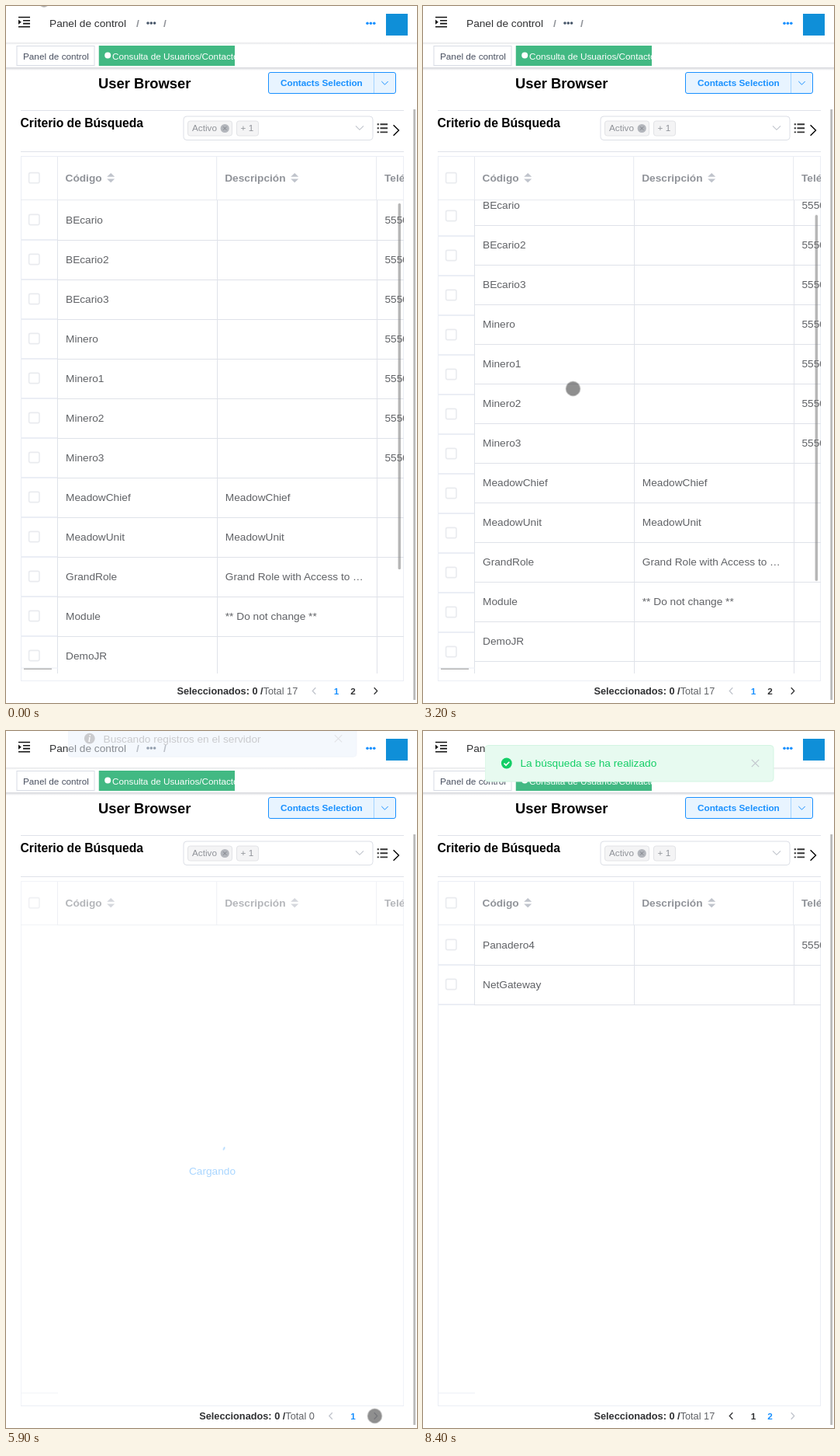
Animation, 530 px wide and 897 px high, one loop 9100 ms. Source, as an HTML page:

```html
<!DOCTYPE html>
<html lang="es">
<head>
<meta charset="utf-8">
<title>User Browser</title>
<style>
  html, body { margin: 0; width: 100%; height: 100%; overflow: hidden; background: #fff; }
  svg { display: block; }
  #stage { width: 100vw; height: 100vh; font: 13.7px "Liberation Sans", Arial, sans-serif; }
  text { fill: #606266; white-space: pre; }
  .bold { font-weight: bold; }
  .small { font-size: 11.76px; }
  .head { font-weight: bold; fill: #909399; }
  .dark { fill: #303133; }
  .muted { fill: #909399; }
  .blue { fill: #1890ff; }
  .mid { text-anchor: middle; }
  .line { stroke: #dfe2e9; fill: none; }
  .soft { stroke: #ebeef5; fill: none; }
  .box { fill: #fff; stroke: #e9ebef; stroke-width: 1.6; }
  .icon { fill: none; stroke: #303133; stroke-width: 1.3; }
  .icon.pale { stroke: #c0c4cc; }
  .bar { fill: rgba(125, 125, 125, .55); }
  .pager { font-size: 12.74px; }
</style>
</head>
<body>
<svg id="stage" viewBox="0 0 530 897" xmlns="http://www.w3.org/2000/svg">
  <defs>
    <linearGradient id="shade" x2="0" y2="1">
      <stop offset="0" stop-color="#d3d5d9"/><stop offset="1" stop-color="#fff"/>
    </linearGradient>
    <g id="sort" fill="#c0c4cc"><path d="M-5-1.2 0-6 5-1.2zM-5 1.4 0 6.2 5 1.4z"/></g>
    <path id="prev" d="M1.8-4.2-2.2 0l4 4.2"/>
    <path id="next" d="M-1.8-4.2 2.2 0l-4 4.2"/>
    <path id="cross" d="M-4.7-4.7 4.7 4.7M4.7-4.7-4.7 4.7" stroke="#c0c4cc" stroke-width="1.1"/>
  </defs>

  <!-- navigation bar -->
  <path d="M16 14.5h15M22 18.8h9M22 22.6h9M16 26.8h15" stroke="#111" stroke-width="1.6"/>
  <path d="M16 17.6v6.2l3.8-3.1z" fill="#111"/>
  <text x="56" y="27" class="dark">Panel de control</text>
  <text x="168" y="27" class="head">/</text>
  <g fill="#48576a"><circle cx="183" cy="22" r="1.8"/><circle cx="187.3" cy="22" r="1.8"/><circle cx="191.6" cy="22" r="1.8"/></g>
  <text x="203" y="27" class="head">/</text>
  <g class="blue"><circle cx="466" cy="22.3" r="1.8"/><circle cx="470.4" cy="22.3" r="1.8"/><circle cx="474.8" cy="22.3" r="1.8"/></g>
  <rect x="490" y="10" width="28" height="28" fill="#0f8fd8"/>
  <rect y="47" width="530" height="3" fill="url(#shade)" opacity=".6"/>

  <!-- open views -->
  <rect x="14" y="51.5" width="100" height="25" fill="#fff" stroke="#d8dce5"/>
  <text x="22" y="69" class="small" style="fill:#495060">Panel de control</text>
  <svg x="119.5" y="51" width="175.5" height="26">
    <rect width="176" height="26" fill="#42b983"/>
    <circle cx="11.7" cy="12.5" r="4" fill="#fff"/>
    <text x="17.5" y="18" class="small" style="fill:#fff">Consulta de Usuarios/Contactos</text>
  </svg>
  <rect y="79" width="530" height="4" fill="url(#shade)"/>

  <!-- title and criteria -->
  <text x="119" y="106" class="bold" style="font-size:18.35px;fill:#000">User Browser</text>
  <rect x="338.5" y="85.5" width="164" height="27" rx="2.5" fill="#e8f4ff" stroke="#1890ff"/>
  <path d="M474.5 86v26" stroke="#a3d3ff"/>
  <text x="354" y="103" class="small bold blue">Contacts Selection</text>
  <path d="M484.3 97l4.2 4.2 4.2-4.2" class="icon" style="stroke:#1890ff;stroke-width:1"/>
  <path d="M19 134.5h494M19 187.5h494" class="line"/>
  <text x="18.5" y="156" class="bold" style="font-size:15.68px;fill:#000">Criterio de Búsqueda</text>
  <rect x="229" y="142" width="244" height="30.5" rx="4" fill="#fff" stroke="#dcdfe6"/>
  <g fill="#f4f4f5" stroke="#e2e3e6">
    <rect x="234.5" y="148" width="57" height="19" rx="3"/><rect x="297.5" y="148" width="28" height="19" rx="3"/>
  </g>
  <text x="240" y="161.3" class="small muted">Activo</text>
  <circle cx="282.2" cy="157.5" r="5.6" fill="#b3b6bc"/>
  <path d="M280 155.3l4.4 4.4M284.4 155.3l-4.4 4.4" stroke="#80838a"/>
  <text x="302.5" y="161.3" class="small muted">+ 1</text>
  <path d="M451 154.3l5 5 5-5" class="icon pale" style="stroke-width:1.1"/>
  <path d="M482.5 152.2h9.6M482.5 157.3h9.6M482.5 162.4h9.6M478.7 152.2h2.2M478.7 157.3h2.2M478.7 162.4h2.2" stroke="#333" stroke-width="1.9"/>
  <path d="M499.6 153.2l6.9 6.8-6.9 6.8" class="icon" style="stroke:#000;stroke-width:1.4"/>
  <rect x="525.3" y="133" width="2.8" height="760" fill="#b9b9b9"/>

  <!-- table -->
  <path d="M19 193.5h494M19 868.5h494M19.5 193v675M512.5 193v675" class="soft"/>
  <path d="M19 249.7h494M66.5 194v56M271.7 194v56M477.7 194v56" class="line" style="stroke:#e6e9ef"/>
  <rect x="29.6" y="214.6" width="13.4" height="13.2" rx="2" class="box"/>
  <text x="76.5" y="226" class="head">Código</text><use href="#sort" x="135.2" y="221"/>
  <text x="282.2" y="226" class="head">Descripción</text><use href="#sort" x="372.2" y="221"/>
  <svg x="478" y="194" width="35" height="55"><text x="10" y="32" class="head">Teléfono</text></svg>

  <svg x="20" y="250" width="493" height="609" viewBox="20 250 493 609">
    <g id="body1"></g><g id="body2"></g>
  </svg>
  <svg x="20" y="250" width="46" height="601.5" viewBox="20 250 46 601.5">
    <rect x="20" y="250" width="46" height="602" fill="#fff"/>
    <g id="side1"></g><g id="side2"></g>
  </svg>
  <path d="M20 852h47" class="soft"/>
  <g id="bars">
    <rect id="thumb" x="505.6" y="254" width="3.5" height="471" rx="1.5" class="bar"/>
    <rect x="23" y="852.4" width="36" height="1.6" class="bar"/>
  </g>

  <g id="mask">
    <rect x="19" y="193" width="494" height="675" fill="#fff" opacity=".9"/>
    <g transform="translate(266 531) scale(.823)">
      <circle id="spin" r="20" fill="none" stroke="#1890ff" stroke-width="2" stroke-linecap="round"/>
    </g>
    <text x="266" y="571" class="mid blue">Cargando</text>
  </g>

  <g id="pagers" class="pager"></g>
  <g id="info"></g>
  <g id="done"></g>
  <circle id="dot" r="9.2" fill="rgba(64,64,64,.59)" stroke="rgba(90,90,90,.35)" stroke-width=".7"/>
</svg>

<script>
const LOOP = 9100, STEP = 100;
const $ = id => document.getElementById(id);
const tracks = [];

// keys: [ms, value, easing towards the next key]
function track(id, prop, keys, format = v => v) {
  const all = [[0, keys[0][1]], ...keys, [LOOP, keys.at(-1)[1]]];
  const frames = all.map(([ms, v, easing = 'linear']) => ({ offset: ms / LOOP, [prop]: format(v), easing }));
  const anim = $(id).animate(frames, LOOP);
  anim.pause();
  tracks.push(anim);
}
const move = ([x, y]) => `translate(${x}px, ${y}px)`;
const show = (id, from, to) =>
  track(id, 'opacity', [[0, from ? 0 : 1, 'step-end'], [from, 1, 'step-end'], [to, to < LOOP ? 0 : 1]]);

// table rows
const page1 = [
  ['BEcario', '', 1], ['BEcario2', '', 1], ['BEcario3', '', 1],
  ['Minero', '', 1], ['Minero1', '', 1], ['Minero2', '', 1], ['Minero3', '', 1],
  ['MeadowChief', 'MeadowChief'], ['MeadowUnit', 'MeadowUnit'],
  ['GrandRole', 'Grand Role with Access to …'], ['Module', '** Do not change **'], ['DemoJR', ''],
  ['Panadero', '', 1], ['Panadero2', '', 1], ['Panadero3', '', 1]
];
const page2 = [['Panadero4', '', 1], ['NetGateway', '']];

function fillRows(n, rows) {
  const end = 250 + 51 * rows.length;
  $('body' + n).innerHTML = rows.map(([name, info, phone], i) => {
    const y = 250 + 51 * i;
    return `<text x="77" y="${y + 30}">${name}</text><text x="282.8" y="${y + 30}">${info}</text>
      ${phone ? `<text x="488.5" y="${y + 30}">5550</text>` : ''}
      <path d="M20 ${y + 51.5}H513" class="line"/>`;
  }).join('') + `<path d="M66.5 250V${end}M272.5 250V${end}M478.5 250V${end}" class="line"/>`;
  $('side' + n).innerHTML = rows.map((_, i) => {
    const y = 250 + 51 * i;
    return `<rect x="29.6" y="${y + 18.4}" width="13.4" height="13.2" rx="2" class="box"/>
      <path d="M20 ${y + 51}H66" class="soft" stroke-width="1.8"/>`;
  }).join('');
}
fillRows(1, page1);
fillRows(2, page2);

// footer states: total, text start, previous arrow, pages, current page
const arrow = (kind, x, on) => `<use href="#${kind}" x="${x}" y="881.5" class="icon ${on ? '' : 'pale'}"/>`;
function pager(id, total, x, prevX, pages, current) {
  const first = 447.5 - 21.5 * (pages - 1);
  let s = `<g id="${id}"><text x="${x}" y="886"><tspan class="bold dark">Seleccionados: 0 /</tspan>Total ${total}</text>`;
  s += arrow('prev', prevX, current > 1) + arrow('next', 476.5, current < pages);
  for (let p = 1; p <= pages; p++)
    s += `<text x="${first + 21.5 * (p - 1)}" y="886" class="small bold mid ${p === current ? 'blue' : 'dark'}">${p}</text>`;
  return s + '</g>';
}
$('pagers').innerHTML = pager('foot1', 17, 220.5, 397.5, 2, 1)
  + pager('foot0', 0, 249.2, 419, 1, 1) + pager('foot2', 17, 220.5, 397.5, 2, 2);

// notices
const notice = (bg, edge, ink, sign, msg) => `
  <rect x=".5" y=".5" width="372" height="46.5" rx="4" fill="${bg}" stroke="${edge}"/>
  <circle cx="28.3" cy="23.5" r="6.9" fill="${ink}"/>${sign}
  <text x="46" y="28.3" style="fill:${ink}">${msg}</text><use href="#cross" x="349" y="23.5"/>`;
$('info').innerHTML = notice('#e9f0fb', '#e3eaf5', '#909399',
  '<text x="28" y="27.7" class="mid" style="font:italic bold 11.5px Liberation Serif,serif;fill:#fff">i</text>',
  'Buscando registros en el servidor');
$('done').innerHTML = notice('#e7faf0', '#d3f5e2', '#13ce66',
  '<path d="M25 23.6l2.5 2.5 4.3-4.4" fill="none" stroke="#fff" stroke-width="1.5"/>',
  'La búsqueda se ha realizado');

// scrolling; the fixed column trails the body on the second pass
const pull = [[1700, 0], [1800, 35], [1900, 110], [2000, 157], [2700, 157], [2800, 0], [3000, 0]];
const back = [[3400, 157], [3700, 157], [3800, 142], [3900, 107], [4000, 70], [4100, 34], [4200, 0]];
const body = [...pull, [3100, 5], [3200, 19], [3300, 90], ...back];
const side = [...pull, [3100, 0], [3200, 5], [3300, 60], ...back];
track('body1', 'transform', body, v => move([0, -v]));
track('side1', 'transform', side, v => move([0, -v]));
track('thumb', 'transform', body, v => move([0, v * .78]));
track('bars', 'opacity', [[2200, 1], [2300, .45], [2400, 0], [2700, 0], [2800, 1], [4400, 1], [4500, .45], [4600, 0]]);

// page change
const CLICK = 5900, DATA = 6600;
for (const id of ['body1', 'side1', 'foot1']) show(id, 0, CLICK);
for (const id of ['body2', 'side2', 'foot2']) show(id, DATA, LOOP);
show('foot0', CLICK, DATA);
track('mask', 'opacity', [[5830, 0, 'ease'], [6130, 1], [DATA, 1, 'ease'], [6900, 0]]);
track('spin', 'transform', [[5815, 0], [7815, 360]], v => `rotate(${v}deg)`);
track('spin', 'strokeDasharray', [[5815, '1px 200px', 'ease-in-out'], [6565, '90px 150px']]);
track('spin', 'strokeDashoffset', [[5815, 0, 'ease-in-out'], [6565, -40, 'ease-in-out'], [7315, -120]], v => v + 'px');

const atTop = y => move([79.5, y]);
track('info', 'transform', [[5815, -29, 'ease'], [6215, 18], [7750, 18, 'ease'], [8150, -29]], atTop);
track('info', 'opacity', [[5815, 0, 'ease'], [6115, 1], [7750, 1, 'ease'], [8050, 0]]);
track('done', 'transform', [[6800, 34], [6900, 77], [7000, 80.2], [7100, 81], [7750, 81, 'ease'], [8150, 18]], atTop);
track('done', 'opacity', [[6700, 0], [6800, .12], [6900, 1]]);

// pointer
const rest = [193.5, 492.5], button = [475.5, 881.5];
track('dot', 'transform', [
  [500, [49, -8.5]], [600, [60, -30]], [700, [100, -20]], [800, [126.5, 20.5]], [900, [110, 150]],
  [1000, [88.5, 314.5]], [1200, [88.5, 314.5]], [1300, [152, 428]], [1400, rest],
  [4600, rest], [4700, [250, 600]], [4800, [345, 765]], [4900, [396.5, 849.5]],
  [5000, [396.5, 849.5], 'ease-out'], [5600, button],
  [7200, button], [8200, [284.5, 292.5]], [8300, [90.5, 26.5]], [8400, [49, -24]]
], move);

function draw(now) {
  const t = Math.floor((now % LOOP) / STEP) * STEP;
  for (const a of tracks) a.currentTime = t;
}
const start = performance.now();
(function tick() {
  draw(performance.now() - start);
  requestAnimationFrame(tick);
})();
</script>
</body>
</html>
```
